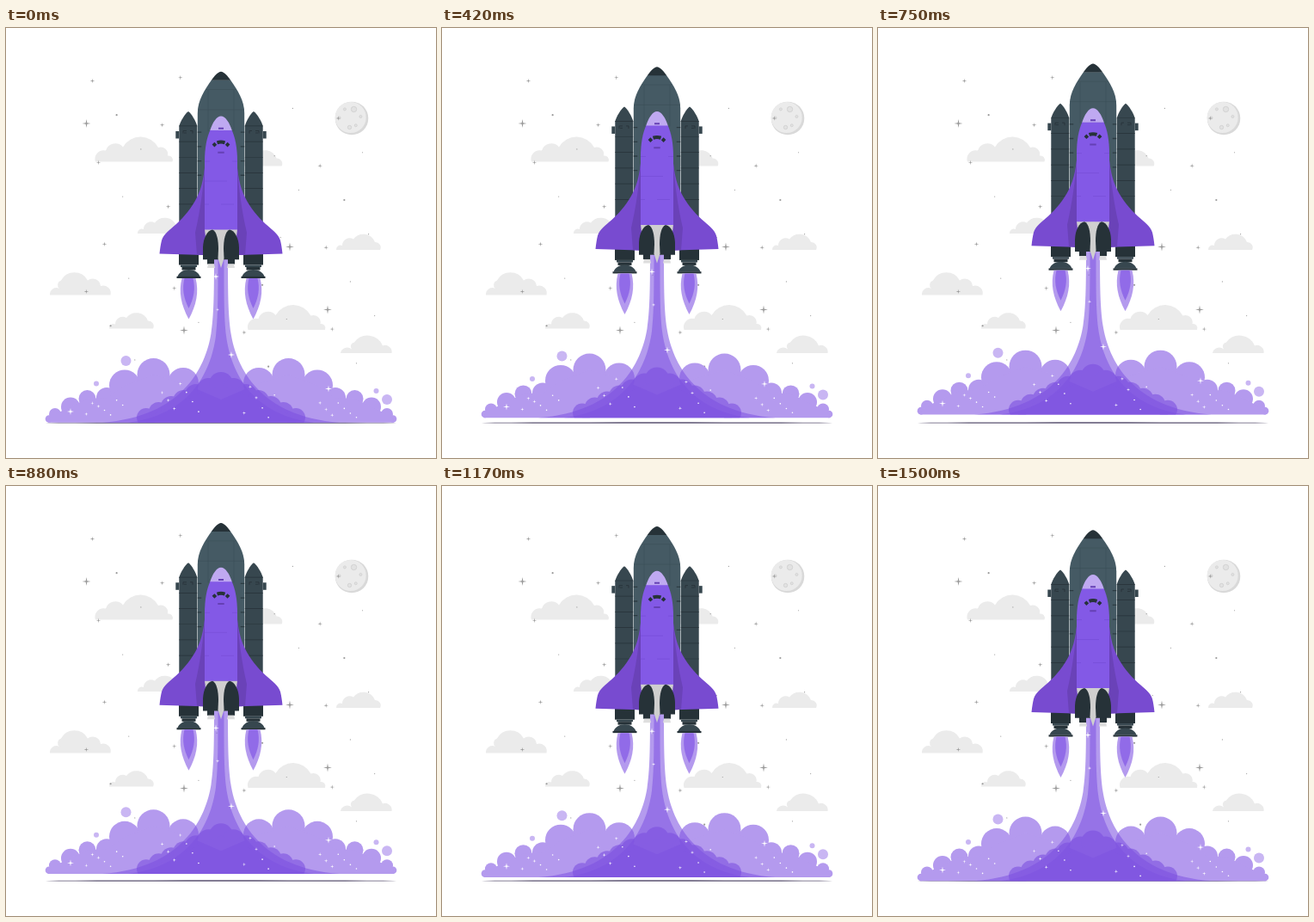
Write an HTML page that moves like this. It is 500 px wide and 500 px high and loops after 1.54 s.

```html
<!DOCTYPE html>
<html lang="en">
<head>
<meta charset="utf-8">
<title>Rocket launch</title>
<style>
html, body { margin: 0; width: 100%; height: 100%; overflow: hidden; background: #fff; }
svg { display: block; width: 100vw; height: 100vh; }
</style>
</head>
<body>
<svg viewBox="0 0 500 500">
  <defs>
    <g id="booster">
      <path d="M201.300 263V114C203 108 208 100 212 97C216 100 220.600 108 222.300 114V263Z" fill="#37474f"/>
      <path d="M211.800 113.500V215" stroke="#263238" stroke-width="21" stroke-dasharray=".7 17.500"/>
      <path d="M206 122.500V119.500H210M217 122.500V119.500H214M207 122H210" stroke="#263238" stroke-width=".8" fill="none"/>
      <path d="M197.300 120H201.300V128.500H197.300Z" fill="#37474f"/>
    </g>
    <g id="engine">
      <path d="M201 262H224V275.500H201Z" fill="#263238"/>
      <path d="M203 275.500H222V278H203Z" fill="#37474f"/>
      <path d="M204.500 278H220.500V281.500H204.500Z" fill="#263238"/>
      <path d="M199.500 289C201 284.500 206 281 212.500 281S224 284.500 225.500 289Z" fill="#37474f"/>
      <path d="M198.500 288.800H226.500V291H198.500Z" fill="#263238"/>
      <path d="M204.500 291C200.500 307 203.500 322 212.500 338.500C221.500 322 224.500 307 220.500 291Z" fill="#b49aee"/>
      <path d="M207.500 291C204.500 303 206.500 314 212.500 326C218.500 314 220.500 303 217.500 291Z" fill="#916be8"/>
    </g>
    <g id="wing">
      <path d="M232 150C231 170 228 185 222 197C216 209 207 220 198 228C190 235 183 240 181 247Q179.500 253 178.500 262.500L229 264L233 240Z" fill="#784bd0"/>
      <path d="M231 163C229.500 185 226 212 220 238L222 263.700L229 264L232 235Z" fill="#6a42b8"/>
    </g>
    <g id="pod">
      <path d="M234 268H242V274.500H234Z" fill="#263238"/>
      <path d="M235 274.500H242L243 279H234Z" fill="#dedede"/>
      <path d="M229 269.300V255C229.500 244 234 235.500 240 234.500C245 236.500 247 246 247 257V269.300Z" fill="#263238"/>
    </g>
  </defs>

  <g id="clouds" fill="#ebebeb"></g>
  <circle cx="402" cy="105" r="19.300" fill="#d9d9d9"/>
  <circle cx="400.700" cy="104" r="18" fill="#ebebeb"/>
  <g id="craters" fill="#e2e2e2" stroke="#cecece" stroke-width=".8"></g>
  <g id="sky" fill="#9a9a9a"></g>
  <ellipse cx="250" cy="459.100" rx="204" ry=".75" fill="#5a5270"/>

  <g id="float">
    <g fill="#c9b6f3">
      <circle cx="139.500" cy="387" r="6"/><circle cx="105" cy="413.500" r="3"/>
      <circle cx="443" cy="432" r="6"/><circle cx="430.500" cy="422" r="3"/>
    </g>
    <g id="smoke" fill="#b49aee"></g>
    <path d="M242 268C242 310 241.500 335 238.500 355C232 395 205 452 112 458.800H388C295 452 268 395 261.500 355C258.500 335 258 310 258 268Z" fill="#8359e3" opacity=".6"/>
    <path d="M246.500 268C246.500 315 246.500 335 244 358C238 402 213 450 142 458.800H358C287 450 262 402 256 358C253.500 335 253.500 315 253.500 268Z" fill="#8359e3" opacity=".6"/>
    <g id="core" fill="#7c50e0" opacity=".6"></g>
    <g id="glints" fill="#fff"></g>

    <use href="#booster"/>
    <use href="#booster" transform="matrix(-1 0 0 1 500 0)"/>
    <path d="M222.800 250V99C222.800 84 231 72 239 60.500H261C269 72 277.200 84 277.200 99V250Z" fill="#455a64"/>
    <path d="M238.800 60.800C242 56 246.500 50.800 250 50.800S258 56 261.200 60.800Z" fill="#263238"/>
    <path d="M232 71.500H268M223 95H277M235 72V120M265 72V120" stroke="#3c4f58" stroke-width=".6" fill="none"/>
    <path d="M225 120.500V175M275 120.500V175" stroke="#2c3b42" stroke-width="4.500" stroke-dasharray="1.300 15.400"/>
    <use href="#engine"/>
    <use href="#engine" x="75"/>

    <use href="#wing"/>
    <use href="#wing" transform="matrix(-1 0 0 1 500 0)"/>
    <path d="M231 234H269L265 269H235Z" fill="#cfcfcf"/>
    <path d="M231 234.500V155C231 140 233.500 127 237.500 118.500H262.500C266.500 127 269 140 269 155V234.500Z" fill="#8359e6"/>
    <path d="M237.300 119C240 110 245 102.500 250 102.500S260 110 262.700 119Z" fill="#bfa9f1"/>
    <path d="M231 155H237M263 155H269M231 178H257M231 205H236M250 205H265" stroke="#754bd4" stroke-width=".6"/>
    <path d="M247 116.700H253M246.300 144.800H253.700" stroke="#6540b4" stroke-width="2"/>
    <path d="M241 137L243.800 134.300M245.500 133.300Q250 131.800 254.500 133.300M256.200 134.300L259 137" stroke="#263238" stroke-width="4" fill="none"/>
    <use href="#pod"/>
    <use href="#pod" transform="matrix(-1 0 0 1 500 0)"/>
    <path d="M248 235H252L253.500 268L250 279L246.500 268Z" fill="#cfcfcf"/>
  </g>
</svg>
<script>
const $ = id => document.getElementById(id);
const fill = (n, f) => Array.from({ length: n }, (_, i) => f(i)).join('');
const dot = (x, y, r) => `<circle cx="${x}" cy="${y}" r="${r}"/>`;
const sparkle = (x, y, r) => {
  const k = r * 0.16;
  return `<path d="M${x} ${y - r}l${k} ${r - k}l${r - k} ${k}l${k - r} ${k}l${-k} ${r - k}l${-k} ${k - r}l${k - r} ${-k}l${r - k} ${-k}Z"/>`;
};
const mirror = s => s + `<g transform="matrix(-1 0 0 1 500 0)">${s}</g>`;

// Evenly scattered pair in 0..1
const scatter = i => [(i * 0.7549 + 0.31) % 1, (i * 0.5698 + 0.17) % 1];

// Outline of round bumps through the points where they meet
function cloud(...pts) {
  let d = `M${pts[0]}`;
  for (let i = 1; i < pts.length; i++) {
    const [[x0, y0], [x, y]] = [pts[i - 1], pts[i]];
    const r = Math.hypot(x - x0, y - y0) * 0.57;
    d += `A${r} ${r} 0 0 1 ${x} ${y}`;
  }
  return `<path d="${d}Z"/>`;
}
const at = (x, y, s) => `<g transform="translate(${x} ${y})">${s}</g>`;
const wide = cloud([0, 0], [12, -13], [32, -17], [73, -16.5], [84, -7], [89.5, 0]);
const small = cloud([0, 0], [7, -5], [20, -12.5], [45, -9], [51, 0]);
$('clouds').innerHTML =
  at(104, 155.5, wide) + at(281.5, 351, wide) +
  at(120, 349.5, small) + at(384, 258, small) + at(153, 239, small) + at(269.5, 160.5, small) +
  at(51, 310.5, cloud([0, 0], [11, -7.5], [13, -17], [44, -17], [59, -10.5], [70.500, 0])) +
  at(389, 378, cloud([0, 0], [13, -4.5], [16, -12.5], [49, -8.5], [59.5, 0]));

$('craters').innerHTML = dot(404.5, 94.5, 3.2) + dot(399.5, 115.5, 2.2) +
  fill(4, i => dot(400 + 12.5 * Math.cos(i * 1.1 - 0.1 + (i > 1)), 104 + 11 * Math.sin(i * 1.1 - 0.1 + (i > 1)), 1.5));

const skyStar = (shape, r, from) => i => {
  const [u, v] = scatter(i + from);
  return shape(70 + u * 360, 55 + v * 340, r);
};
$('sky').innerHTML =
  sparkle(93.5, 111, 5) + sparkle(330, 254.5, 5) + sparkle(374, 327.5, 5) + sparkle(207, 351.5, 5) +
  fill(15, skyStar(sparkle, 2.8, 0)) + fill(7, skyStar(dot, 1.1, 15)) + fill(18, skyStar(dot, 0.6, 22));

const puffs = [[50, 454.5, 4.3], [57, 449, 7], [75, 440.5, 11], [94.5, 431, 10], [117, 430, 12],
  [138, 415.5, 18], [171.5, 403, 19], [206, 413, 18]];
const ridge = puffs.map(([x, y]) => `L${x} ${y}`).join('');
$('smoke').innerHTML = mirror(puffs.map(p => dot(...p)).join('') +
  `<path d="M49 458.800${ridge}L250 432V458.800Z"/>`);

$('core').innerHTML = '<clipPath id="floor"><path d="M0 0H500V458.800H0Z"/></clipPath><g clip-path="url(#floor)">' +
  fill(13, i => {
    const side = i - 6, d = Math.abs(side);
    return dot(250 + side * 14.5, 414 + d * 6.5, 14 - d * 0.5);
  }) + '<path d="M250 414L337 453V459H163V453Z"/></g>';

const glint = (shape, r, from) => i => {
  const [u, v] = scatter(i + from);
  const x = 70 + u * 360, top = 403 + Math.abs(x - 250) * 0.22;
  return shape(x, top + v * (453 - top), r);
};
$('glints').innerHTML =
  sparkle(244, 289, 4) + sparkle(75, 446, 4) + sparkle(262, 380, 4) + sparkle(375, 419.5, 4) + sparkle(246, 327.5, 2.2) +
  fill(13, glint(sparkle, 2.2, 0)) + fill(14, glint(dot, 0.8, 13));

const LOOP = 1540, LOW = 1500, HIGH = 725, RISE = 10.2;

// Constant-speed rise and fall, stepped at 24 pictures a second
function lift(ms) {
  const t = Math.floor((Math.floor(ms / 10) + 0.499) * 0.24) * 1000 / 24;
  const up = (t - LOW + 2 * LOOP) % LOOP;
  const rise = HIGH - LOW + LOOP;
  return up < rise ? up / rise : (LOOP - up) / (LOOP - rise);
}

const start = performance.now(), rest = lift(0);
function draw() {
  const t = Math.max(0, performance.now() - start) % LOOP;
  $('float').setAttribute('transform', `translate(0 ${((rest - lift(t)) * RISE).toFixed(3)})`);
  requestAnimationFrame(draw);
}
draw();
</script>
</body>
</html>
```
